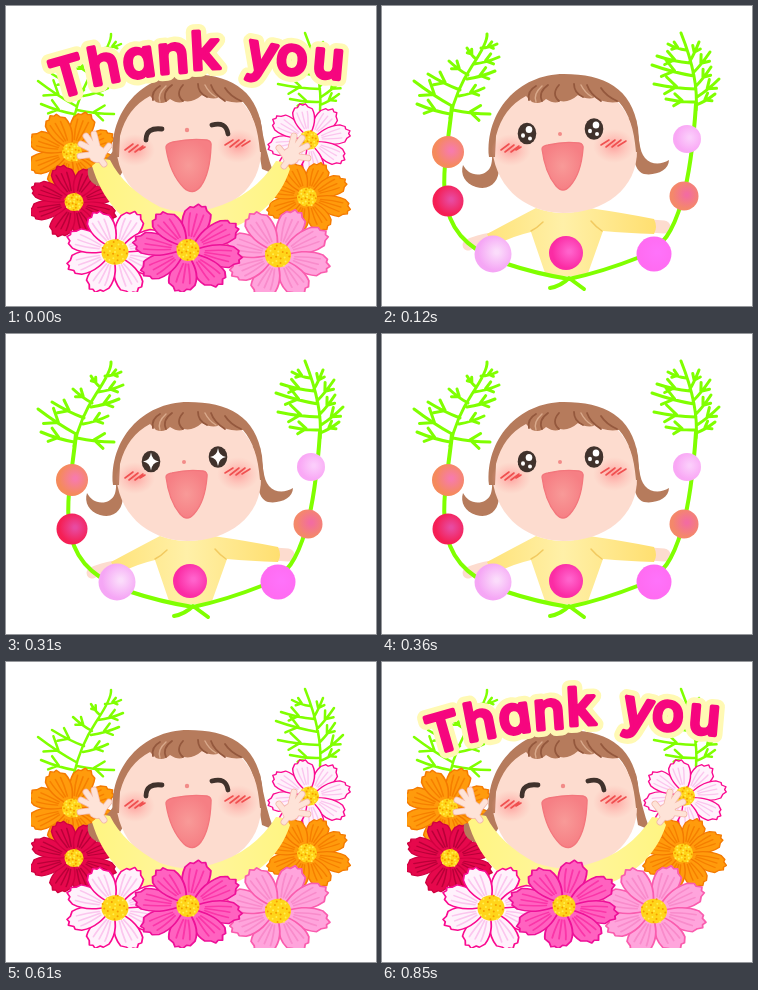
An HTML page that plays this animation: 370x300 px, repeating every 970 ms.

```html
<!DOCTYPE html>
<html lang="en">
<head>
<meta charset="utf-8">
<title>Thank you</title>
<style>
html, body { margin: 0; width: 100%; height: 100%; overflow: hidden; background: #fff; }
svg { display: block; width: 100vw; height: 100vh; }
.line { fill: none; stroke-linecap: round; stroke-linejoin: round; }
text { font: 500 52px Inter, "Open Sans", sans-serif; font-feature-settings: "cv11"; text-anchor: middle; stroke-linejoin: round; }
</style>
</head>
<body>
<svg id="stage" viewBox="0 0 370 300">
  <defs>
    <radialGradient id="blush"><stop offset="0" stop-color="#ff9090" stop-opacity=".8"/><stop offset="1" stop-color="#ffb0a8" stop-opacity="0"/></radialGradient>
    <radialGradient id="mouth"><stop offset="0" stop-color="#f89a98"/><stop offset="1" stop-color="#f67f84"/></radialGradient>
    <linearGradient id="dress"><stop offset="0" stop-color="#ffe37a"/><stop offset=".45" stop-color="#fff0a8"/><stop offset="1" stop-color="#ffdf70"/></linearGradient>
    <linearGradient id="sweater"><stop offset="0" stop-color="#fff582"/><stop offset=".5" stop-color="#fff5a0"/><stop offset="1" stop-color="#fff582"/></linearGradient>
    <clipPath id="bloomBox"><path d="M25 16H345V286H25Z"/></clipPath>
    <clipPath id="girlBox"><path d="M25 16H345V250H25Z"/></clipPath>
  </defs>
</svg>
<script>
const stage = document.getElementById('stage');
const GREEN = '#80ff00', SKIN = '#fddccf', HAIR = '#b67b5c', DARK = '#40322c';

let seed = 7;
const random = () => (seed = seed * 16807 % 2147483647) / 2147483647;

function add(parent, tag, attrs = {}) {
  const node = document.createElementNS('http://www.w3.org/2000/svg', tag);
  for (const key in attrs) node.setAttribute(key, attrs[key]);
  return parent.appendChild(node);
}
const group = (parent, attrs) => add(parent, 'g', attrs);
const shape = (parent, d, fill, attrs = {}) => add(parent, 'path', { d, fill, ...attrs });
const line = (parent, d, stroke, width) =>
  add(parent, 'path', { d, stroke, 'stroke-width': width, class: 'line' });
const oval = (parent, cx, cy, rx, ry, fill) => add(parent, 'ellipse', { cx, cy, rx, ry, fill });

// Feathery leaves: each twig is [x1, y1, x2, y2]
const leaves = [
  { stem: 'M68 112Q74 84 90 60T105 28', twigs: [
    [70, 100, 32, 75], [68, 108, 35, 98], [78, 84, 46, 68], [86, 69, 67, 55], [94, 53, 85, 42],
    [99, 42, 115, 38], [92, 58, 117, 51], [85, 73, 113, 65], [77, 90, 102, 82], [71, 104, 108, 108]] },
  { stem: 'M314 104Q317 72 299 27', twigs: [
    [304, 44, 286, 38], [308, 57, 275, 50], [312, 70, 270, 59], [314, 83, 272, 78], [314, 96, 284, 93],
    [308, 55, 317, 36], [311, 67, 328, 46], [314, 80, 329, 61], [315, 91, 337, 73], [314, 99, 333, 88]] }
];

function drawLeaves(parent, width) {
  for (const { stem, twigs } of leaves) {
    let d = stem;
    for (const [x1, y1, x2, y2] of twigs) {
      d += `M${x1} ${y1}Q${(x1 + x2) / 2} ${(y1 + y2) / 2 + 2} ${x2} ${y2}`;
      const dx = (x2 - x1) * .33, dy = (y2 - y1) * .33;
      for (const turn of [.65, -.65]) {
        const c = Math.cos(turn), s = Math.sin(turn);
        d += `M${x1 + dx * 1.4} ${y1 + dy * 1.4}l${dx * c - dy * s} ${dx * s + dy * c}`;
      }
    }
    line(parent, d, GREEN, width);
  }
}

function drawFlower(parent, [x, y, rx, ry, start, core, fill, streak, edge]) {
  const flower = group(parent, { transform: `translate(${x} ${y})` });
  for (let i = 0; i < 8; i++) {
    const angle = start + i * 45 + (random() - .5) * 5;
    const len = 43 + random() * 4;
    const petal = group(flower, { transform: `scale(${rx / 45} ${ry / 45}) rotate(${angle})` });
    shape(petal, `M3 0C12 -6 22 -13 ${len - 9} -11L${len - 4} -8L${len - 4} -5L${len} -2
      L${len - 2} 1L${len - 1} 4L${len - 5} 6L${len - 8} 10C24 13 12 7 3 0Z`, fill,
      { stroke: edge, 'stroke-width': 1.5, 'stroke-linejoin': 'round' });
    for (const offset of [-6, -1, 4])
      line(petal, `M14 ${offset * .4}Q26 ${offset} ${len - 10} ${offset * 1.1}`, streak, 1.5);
  }
  oval(flower, 0, 0, core, core * .95, '#ffd51a');
  for (let i = 0; i < 26; i++) {
    const a = i * 2.4, r = core * Math.sqrt(i / 27);
    oval(flower, r * Math.cos(a), r * Math.sin(a), 1, 1, i % 2 ? '#f59c00' : '#ffed50');
  }
}

function drawHead(parent, loosePigtails) {
  if (loosePigtails) {
    shape(parent, 'M109 138C112 158 109 165 100 168C91 170 85 166 81 159C78 168 83 178 94 181C109 185 117 175 117 162L115 130Z', HAIR);
    shape(parent, 'M245 112C250 145 251 165 262 168C274 170 287 164 287 154C279 159 269 159 263 152C257 145 257 132 254 113Z', HAIR);
  } else {
    shape(parent, 'M109 142Q98 160 82 162Q80 177 95 181Q109 180 117 165Z', HAIR);
    shape(parent, 'M245 106Q253 145 256 163L268 168Q259 145 254 112Z', HAIR);
  }
  shape(parent, 'M110 138C110 96 140 74 182 74C226 74 252 104 255 143C256 183 222 207 181 207C140 206 111 178 110 138Z', SKIN);
  shape(parent, `M107 151C103 106 136 68 182 68C222 68 250 82 256 122L258 146L254 146C252 122 247 108 237 96
    Q222 98 213 91Q207 95 196 89Q187 97 178 95Q173 99 164 93Q158 99 150 96L144 90
    Q121 102 114 130L113 151Z`, HAIR);
  line(parent, 'M154 80Q145 85 147 94M166 79Q156 86 160 95M177 79Q169 88 177 95M192 78Q192 87 201 91M205 79Q208 88 219 95M219 82Q224 90 235 95', '#94583d', 1.8);
  line(parent, 'M160 80Q151 88 154 96M199 79Q203 87 210 91', '#d9a98b', 1.4);
}

function drawCheeks(parent) {
  oval(parent, 129, 144, 20, 16, 'url(#blush)');
  oval(parent, 232, 140, 21, 17, 'url(#blush)');
  line(parent, 'M119 144l8 -6M123 146l9 -7M129 146l8 -6M134 144l5 -3M219 139l8 -5M224 141l9 -7M230 141l9 -7M236 140l8 -5', '#f05050', 1.6);
}

const drawMouth = (parent, d) =>
  shape(parent, d, 'url(#mouth)', { stroke: '#f3767c', 'stroke-width': 1.3 });

function drawHand(parent, x, y, flip) {
  const hand = group(parent, { transform: `translate(${x} ${y}) scale(${flip} 1)` });
  const fingers = 'M0 0L-16 2M-1 -3L-15 -10M0 -4L-10 -18M2 -4L-2 -20M5 2L13 -8M2 2L8 10';
  line(hand, fingers, '#f3b7a7', 6.8);
  oval(hand, 1, 0, 9, 9, '#f3b7a7');
  line(hand, fingers, '#fee3d8', 5.2);
  oval(hand, 1, 0, 8.2, 8.2, '#fee3d8');
}

// Bud scene
const buds = group(stage);
line(buds, 'M110 232Q96 234 86 239', SKIN, 11);
line(buds, 'M268 220L282 221', SKIN, 13);
shape(buds, 'M154 202Q182 212 207 202Q242 207 272 213Q276 221 272 228Q244 227 221 225L205 270H164L149 226Q132 230 118 237Q108 236 105 228Q131 214 154 202Z', 'url(#dress)');
line(buds, 'M149 225Q155 222 161 216M220 225Q214 221 209 215', '#f2ca60', 1.5);
drawHead(buds, true);
drawCheeks(buds);
drawMouth(buds, 'M160 143Q160 140 166 139Q182 135 197 137Q202 138 201 143Q199 168 188 180Q181 188 174 180Q163 167 160 143Z');
oval(buds, 178, 128, 2, 2, '#f28b88');
const eyes = [[145, 127.5], [212, 123]];
for (const [x, y] of eyes) oval(buds, x, y, 9.3, 10.8, DARK);
const glints = group(buds), sparkles = group(buds);
for (const [x, y] of eyes) {
  oval(glints, x + 2, y - 4, 3.3, 3.6, '#fff');
  oval(glints, x - 4, y + 2, 2, 2.2, '#fff');
  oval(glints, x + 3, y + 5, 2, 2, '#fff');
  shape(sparkles, `M${x} ${y - 9}q1 8 8 9q-7 1 -8 9q-1 -8 -8 -9q7 -1 8 -9Z`, '#fff');
}
drawLeaves(buds, 3);
line(buds, 'M70 100C66 140 58 172 65 202C72 232 94 246 122 257Q155 268 187 273M314 98Q310 160 300 195C291 225 282 241 258 251Q220 266 187 273M168 282Q179 280 187 272L202 283', GREEN, 4);
[
  [66, 146, 16, '#f58a5c', '#f77bab'], [66, 195, 15.5, '#f51f55', '#e84aa0'],
  [111, 248, 18.5, '#f5a6f5', '#fbdcfb'], [184, 247, 17, '#fb2ca4', '#ff62cc'],
  [272, 248, 17.5, '#ff6cf2', '#ff72fa'], [302, 190, 14.5, '#f4886a', '#f36ca0'],
  [305, 133, 14, '#f9a8f5', '#fbcdfb']
].forEach(([x, y, r, outer, inner], i) => {
  const fill = add(stage.querySelector('defs'), 'radialGradient', { id: 'bud' + i, cx: '60%', cy: '45%' });
  add(fill, 'stop', { offset: .1, 'stop-color': inner });
  add(fill, 'stop', { offset: 1, 'stop-color': outer });
  oval(buds, x, y, r, r, `url(#bud${i})`);
});

// Bloom scene
const bloom = group(stage, { 'clip-path': 'url(#bloomBox)' });
drawLeaves(bloom, 2.5);
const orange = ['#ff9b0c', '#f67f00', '#f47a00'];
const white = ['#fff2fc', '#fbc6ee', '#fa0a90'];
const backFlowers = [
  [66, 146, 47, 40, -69, 10, ...orange],
  [68, 196, 46, 37, -20, 9.5, '#e6084c', '#b90038', '#d00040'],
  [303, 134, 43, 38, -55, 10, ...white],
  [301, 191, 44, 38, -70, 10, ...orange]
];
const frontFlowers = [
  [109, 246, 52, 44, -67, 13.5, ...white],
  [272, 249, 54, 46, -71, 13, '#ffa4dc', '#f98bcb', '#fa5cae'],
  [182, 244, 56, 45, -79, 11.5, '#ff62c0', '#fb35a8', '#ee1098']
];
for (const flower of backFlowers) drawFlower(bloom, flower);
const girl = group(group(bloom, { 'clip-path': 'url(#girlBox)' }));
drawHead(girl, false);
drawCheeks(girl);
drawMouth(girl, 'M160 142Q159 138 167 136Q185 132 201 134Q206 135 205 141Q204 167 195 180Q187 190 178 182Q164 168 160 142Z');
oval(girl, 181, 124, 2.2, 2.2, '#f28b88');
line(girl, 'M140 134Q140 121 156 123M206 119Q220 115 222 128', DARK, 4.8);
shape(girl, `M86 160Q95 151 104 154Q118 182 154 201Q182 211 207 202Q248 190 270 155Q280 155 284 163
  C274 194 251 213 225 222L228 248L236 300H132L139 260L146 228C116 217 96 193 86 160Z`, 'url(#sweater)');
line(girl, 'M146 228Q147 222 151 218M225 222Q223 217 219 214', '#f3dc72', 1.3);
drawHand(girl, 90, 148, 1);
drawHand(girl, 286, 150, -1);
for (const flower of frontFlowers) drawFlower(bloom, flower);

// Lettering along a wavy baseline
const greeting = group(stage);
const letters = [
  ['T', 67, 88, -16], ['h', 101, 77, -11], ['a', 135, 71, -8], ['n', 168, 67, -4], ['k', 200, 63, -3],
  ['y', 253, 65, 11], ['o', 285, 68, 4], ['u', 321, 72, 5]
];
for (const [color, width] of [['#fff9b4', 15], ['#f6067f', 4]])
  for (const [letter, x, y, turn] of letters)
    add(greeting, 'text', {
      transform: `translate(${x} ${y}) rotate(${turn})`, fill: color, stroke: color, 'stroke-width': width
    }).textContent = letter;

const show = (node, on) => node.setAttribute('visibility', on ? 'inherit' : 'hidden');

function render(ms) {
  const t = ms % 970;
  const budding = t >= 120 && t < 610;
  const starry = t >= 240 && t < 360;
  show(buds, budding);
  show(glints, !starry);
  show(sparkles, starry);
  show(bloom, !budding);
  show(greeting, t < 120 || t >= 850);
  girl.setAttribute('transform', `translate(0 ${t >= 730 && t < 850 ? -45 : 0})`);
}

const started = performance.now();
function tick() {
  render(performance.now() - started);
  requestAnimationFrame(tick);
}
tick();
</script>
</body>
</html>
```
